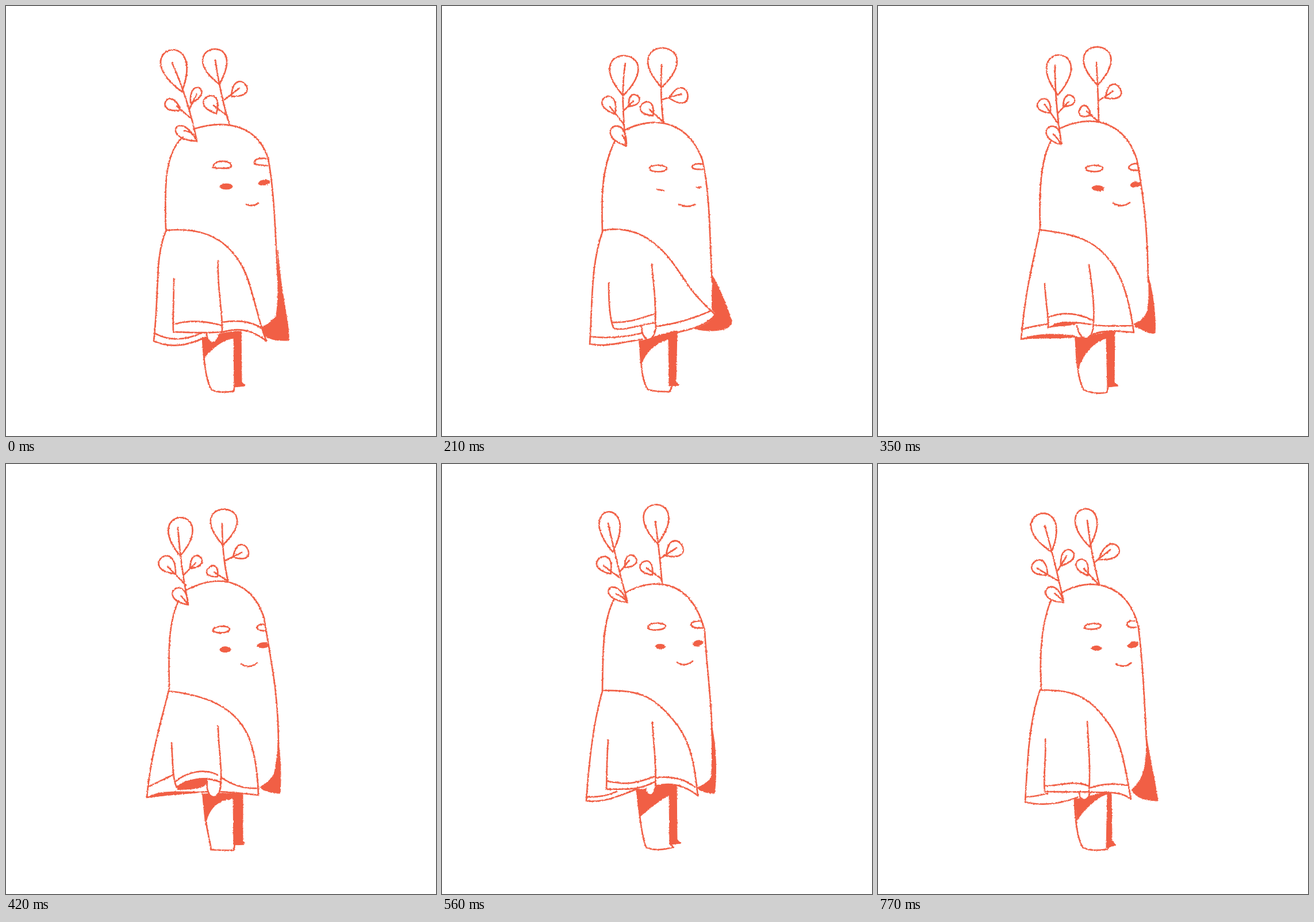
These frames come from a looping animation (748x748 px, 840 ms). An HTML page without scripts:

```html
<!DOCTYPE html>
<html lang="en">
<head>
<meta charset="utf-8">
<title>Sprout in a cloak</title>
<style>
html, body { margin: 0; width: 100%; height: 100%; overflow: hidden; background: #fff }
svg { display: block; width: 100%; height: 100% }
path { fill: none; stroke: #f15f45; stroke-width: 2.7; stroke-linecap: round; stroke-linejoin: round; animation: 840ms step-end infinite }
.solid { fill: #f15f45; stroke-width: 1 }

/* Drawn on 70 ms holds; steps() fills the holds between key poses. */
#left { animation-name: left }
#right { animation-name: right }
#head { animation-name: head }
#face { animation-name: face }
#eyes { animation-name: eyes }
#cloak { animation-name: cloak }
#sleeve { animation-name: sleeve }
#hand { animation-name: hand; fill: #fff }
#leg { animation-name: leg }
#shade { animation-name: shade }
#lining { animation-name: lining; stroke: none }

/* stem, big leaf, then small leaves with their veins */
@keyframes left {
0%, to { d: path("M289 99Q318 165 332 235M306 149C204 75 350 31 306 149M304 181C253 189 285 133 304 181M297 174L321 195M321 169C317 119 367 149 321 169M332 153L319 179M332 235C266 232 302 176 332 235M310 217Q325 218 332 235") }
8.333% { d: path("M304 103Q311 165 325 237M309 149C230 66 370 52 309 149M302 186C244 182 304 128 302 186M293 177L318 196M321 168C314 118 370 152 321 168M331 152L317 181M325 238C261 229 309 175 325 238M308 224Q318 226 325 238"); animation-timing-function: steps(2) }
25% { d: path("M319 99Q310 150 320 243M315 156C232 60 404 66 315 156M301 188C245 168 311 130 301 188M292 175L315 204M325 175C321 131 369 169 325 175M333 165L315 183M321 243C257 224 321 176 321 243M313 224Q319 232 321 243"); animation-timing-function: steps(2) }
41.666% { d: path("M308 103Q307 160 319 240M313 155C242 60 390 64 313 155M300 186C247 182 303 132 300 186M290 171L315 207M322 175C323 130 367 174 322 175M331 167L314 185M318 241C259 223 321 179 318 241M305 223Q313 230 318 241") }
50% { d: path("M299 110Q304 180 317 244M303 160C231 71 377 71 303 160M295 191C228 184 296 124 295 191M281 178L313 211M320 182C321 134 367 176 320 182M330 172L309 193M317 245C257 234 313 184 317 245M305 230Q312 237 317 245"); animation-timing-function: steps(2) }
66.666% { d: path("M289 103Q301 160 323 241M297 153C224 67 348 53 297 153M293 191C233 177 305 131 293 191M281 177L308 197M318 180C317 133 365 177 318 180M326 167L309 188M323 241C261 234 299 184 323 241M303 226Q314 230 323 241"); animation-timing-function: steps(3) }
91.666% { d: path("M290 107Q308 170 323 240M302 153C203 88 345 42 302 153M295 193C234 195 292 133 295 193M276 181L313 203M318 177C315 122 371 162 318 177M328 160L312 186M323 241C261 237 307 181 323 241M307 225Q316 231 323 241") }
}
@keyframes right {
0%, to { d: path("M364 94Q374 160 389 207M371 136C284 69 426 41 371 136M392 157C396 98 452 160 392 157M406 143L380 163M366 187C308 168 382 128 366 187M361 173L385 191") }
8.333% { d: path("M371 96Q377 150 386 206M377 140C290 68 448 52 377 140M391 157C394 101 450 163 391 157M401 147L381 163M367 187C312 186 374 132 367 187M360 178L382 191"); animation-timing-function: steps(2) }
25% { d: path("M382 102Q379 155 385 203M382 142C297 47 473 53 382 142M395 160C428 106 448 196 395 160M416 153L382 163M367 191C314 185 374 139 367 191M361 180L383 200"); animation-timing-function: steps(2) }
41.666% { d: path("M380 98Q383 150 384 201M382 138C298 49 464 49 382 138M396 160C402 101 454 171 396 160M409 148L385 164M370 190C329 204 361 146 370 190M363 183L383 201") }
50% { d: path("M376 104Q376 160 386 203M377 141C301 55 461 61 377 141M395 162C406 105 450 179 395 162M410 154L381 168M368 196C323 198 373 152 368 196M362 188L385 203"); animation-timing-function: steps(2) }
66.666% { d: path("M371 100Q378 150 383 208M375 139C294 52 446 44 375 139M390 160C396 95 454 171 390 160M408 146L380 164M366 193C315 186 371 142 366 193M356 181L382 200"); animation-timing-function: steps(3) }
91.666% { d: path("M364 98Q370 155 385 210M368 144C291 65 421 47 368 144M384 166C406 102 452 172 384 166M404 149L377 171M365 194C315 175 373 141 365 194M358 182L382 208") }
}
@keyframes head {
0%, to { d: path("M278 388C276 320 275 255 308 228M326 214C380 197 436 205 456 265C468 330 468 400 474 490") }
8.333% { d: path("M280 388C274 330 276 265 306 230M320 216C378 194 432 205 452 265C466 340 467 400 470 480"); animation-timing-function: steps(2) }
25% { d: path("M279 392C277 330 278 280 301 234M317 216C372 190 428 200 453 268C467 330 465 400 470 480"); animation-timing-function: steps(2) }
41.666% { d: path("M282 388C280 320 283 270 300 236M316 213C372 187 428 200 450 266C466 350 469 410 470 480") }
50% { d: path("M284 392C283 330 281 280 300 238M314 219C372 189 428 203 449 268C462 350 474 400 474 490"); animation-timing-function: steps(2) }
66.666% { d: path("M279 394C280 340 278 275 299 236M319 224C362 199 432 194 457 290C460 350 468 400 470 470"); animation-timing-function: steps(3) }
91.666% { d: path("M284 392C281 340 283 280 301 237M320 224C368 195 436 206 453 284C460 340 463 400 467 480") }
}
/* brows and mouth */
@keyframes face {
0%, to { d: path("M360 281C361 266 392 267 392 279C390 284 368 282 360 281M452 265C436 264 432 268 432 273C434 278 444 276 455 278M418 345Q428 350 439 343") }
8.333% { d: path("M360 279C360 271 393 271 393 279C393 287 360 287 360 279M453 267C446 268 437 270 434 273C438 278 444 278 453 279M418 346Q428 348 440 345"); animation-timing-function: steps(2) }
25% { d: path("M361 283C361 275 391 275 391 283C391 290 361 290 361 283M453 275C442 273 436 276 435 280C437 285 445 284 454 284M412 345Q428 352 440 345"); animation-timing-function: steps(2) }
41.666% { d: path("M361 283C365 275 391 276 391 282C391 291 361 289 361 283M452 274C444 273 437 277 436 281C438 286 446 286 454 286M409 343Q424 352 438 342") }
50% { d: path("M360 289C361 281 389 280 389 287C388 296 360 295 360 289M450 279C441 278 437 281 437 285C438 290 444 290 452 290M409 348Q424 357 437 346"); animation-timing-function: steps(2) }
66.666% { d: path("M358 284C360 274 389 275 389 283C386 290 358 291 358 284M452 273C440 272 433 276 433 279C435 285 444 286 453 285M409 345Q422 354 436 343"); animation-timing-function: steps(3) }
91.666% { d: path("M359 284C362 276 388 276 388 281C387 289 358 289 359 284M446 273C438 271 433 276 433 279C435 285 442 285 449 284M414 348Q429 356 440 346") }
}
@keyframes eyes {
0%, to { d: path("M372 314C373 307 394 308 394 314C394 320 373 321 372 314M439 309C440 301 459 301 459 306C458 312 440 314 439 309") }
8.333% { d: path("M374 315C375 309 393 309 393 315C392 321 375 320 374 315M440 311C442 304 458 304 458 309C456 314 441 315 440 311"); animation-timing-function: steps(2) }
25% { d: path("M373 319C378 318 385 320 387 321C385 322 378 322 373 319M442 315C445 314 450 314 452 315C450 317 445 317 442 315"); animation-timing-function: steps(2) }
41.666% { d: path("M372 316C374 311 393 311 393 318C392 324 373 323 372 316M439 312C440 304 457 304 457 310C456 315 440 318 439 312") }
50% { d: path("M372 323C372 316 391 316 391 323C390 329 372 329 372 323M437 316C440 309 457 309 457 315C455 322 439 321 437 316"); animation-timing-function: steps(2) }
66.666% { d: path("M371 317C372 312 388 312 388 318C386 324 372 323 371 317M436 314C438 305 453 305 454 310C452 318 437 319 436 314"); animation-timing-function: steps(3) }
91.666% { d: path("M371 321C376 314 384 315 390 321C384 326 376 325 371 321M434 317C436 308 453 306 453 313C452 320 435 322 434 317") }
}
/* back, collar, rear hem, front hem */
@keyframes cloak {
0%, to { d: path("M279 389C258 440 268 480 257 583M279 390C330 386 380 395 412 455C428 485 436 540 453 583M257 583C285 595 315 592 347 576M260 570C285 583 310 582 340 569M377 550C400 546 425 548 442 559M374 568C400 560 425 560 453 583") }
8.333% { d: path("M280 389C258 450 266 500 257 584M280 389C340 386 385 410 417 465C428 495 435 530 453 560M257 584C280 595 315 590 349 588M260 570C285 582 310 580 347 569M375 556C400 548 425 543 445 552M372 577C395 572 425 560 438 565"); animation-timing-function: steps(2) }
25% { d: path("M280 390C258 450 262 520 257 588M280 390C370 376 405 455 435 495C448 512 460 522 475 537M257 588C285 594 310 585 348 580M258 575C285 578 315 577 348 569M374 557C405 553 435 545 468 530M372 577C395 568 455 565 475 537"); animation-timing-function: steps(2) }
41.666% { d: path("M281 389C274 430 256 490 249 580M281 389C345 398 380 405 412 455C430 485 440 530 445 568M249 580C275 570 320 570 346 576M250 563C265 557 285 555 295 553M378 555C400 558 425 556 442 556M374 571C395 562 425 566 445 568") }
50% { d: path("M283 394C275 430 252 500 245 580M283 395C345 402 395 420 420 470C433 500 438 540 439 576M245 580C275 575 320 572 350 570M249 561C265 552 280 547 291 540M374 545C395 560 415 565 437 564M372 570C395 571 420 574 439 576"); animation-timing-function: steps(2) }
66.666% { d: path("M279 395C266 440 256 510 251 586M279 394C350 393 370 405 410 455C435 490 440 530 445 577M251 586C280 590 310 577 340 565M253 579C275 580 290 576 304 570M372 546C400 541 425 550 440 562M372 560C405 551 430 565 445 577"); animation-timing-function: steps(3) }
91.666% { d: path("M282 393C262 450 260 520 256 588M282 393C345 393 370 405 407 460C425 490 432 540 440 583M256 588C285 595 315 592 347 580M257 579C275 579 285 575 295 573M370 563C395 555 415 556 435 559M367 571C400 571 425 570 440 583") }
}
@keyframes sleeve {
0%, to { d: path("M292 474C292 510 290 540 291 567C310 567 340 570 375 567M369 443C367 490 377 530 376 566M295 553C320 546 350 548 376 556") }
8.333% { d: path("M292 475C290 510 291 540 291 555C310 561 340 568 371 567M369 440C370 480 376 530 370 566M292 538C310 553 340 553 371 553"); animation-timing-function: steps(2) }
25% { d: path("M290 482C290 520 293 550 299 561C320 565 335 556 371 551M365 449C367 480 373 510 371 553M296 550C320 552 340 545 368 536"); animation-timing-function: steps(2) }
41.666% { d: path("M290 483C292 520 297 540 296 560C315 550 335 548 371 554M367 450C373 490 378 530 374 562M298 541C320 532 345 533 374 547") }
50% { d: path("M288 485C290 520 290 550 297 562C315 548 345 543 372 553M369 456C369 490 377 530 373 565M294 553C315 535 345 529 368 541"); animation-timing-function: steps(2) }
66.666% { d: path("M289 480C286 520 287 540 286 566C310 564 335 571 370 553M366 449C368 490 374 530 371 562M289 552C320 558 335 557 371 543"); animation-timing-function: steps(3) }
91.666% { d: path("M291 478C293 510 287 545 290 570C310 570 340 571 367 570M364 448C366 490 370 530 367 570M292 560C315 560 340 549 366 560") }
}
@keyframes hand {
0%, to { d: path("M349 570C350 590 367 590 371 572") }
8.333% { d: path("M349 570C352 592 368 592 372 566"); animation-timing-function: steps(2) }
25% { d: path("M347 556C347 588 372 588 372 554"); animation-timing-function: steps(2) }
41.666% { d: path("M346 556C350 582 372 590 375 554") }
50% { d: path("M350 552C346 585 374 590 373 555"); animation-timing-function: steps(2) }
66.666% { d: path("M354 566C356 580 372 580 372 556"); animation-timing-function: steps(3) }
91.666% { d: path("M350 572C350 588 367 588 368 572") }
}
@keyframes leg {
0%, to { d: path("M342 577C344 620 348 655 358 668C370 673 385 672 396 670L398 660") }
8.333% { d: path("M342 590C346 630 350 650 356 664C365 671 385 671 396 669L398 660"); animation-timing-function: steps(2) }
25% { d: path("M344 583C346 630 349 655 358 667C370 671 385 671 396 671L400 662"); animation-timing-function: steps(2) }
41.666% { d: path("M344 578C345 630 350 655 358 668C370 673 385 675 398 672L401 660") }
50% { d: path("M343 575C346 630 354 650 357 671C370 672 385 672 396 672L398 662"); animation-timing-function: steps(2) }
66.666% { d: path("M339 566C344 620 350 655 355 667C370 673 385 671 402 667L397 660"); animation-timing-function: steps(3) }
91.666% { d: path("M342 583C343 630 349 655 356 667C370 674 385 672 400 670L402 662") }
}
/* far side of the cloak, then the legs */
@keyframes shade {
0%, to { d: path("M473 425C474 490 473 535 468 541C460 551 452 556 445 558C447 565 449 570 452 575C462 582 478 582 492 582C494 555 478 500 473 425M342 577C365 575 380 565 409 566L410 654L416 661L397 663L396 578C378 580 358 595 345 612Z") }
8.333% { d: path("M471 470C470 500 469 540 464 551C460 557 456 558 453 560C448 562 444 564 436 563C450 573 470 573 490 573C486 545 476 500 471 470M341 588C360 585 380 574 410 566L411 654L415 660L394 661L394 576C376 584 358 602 345 617Z"); animation-timing-function: steps(2) }
25% { d: path("M471 470C470 490 469 515 470 529C474 532 476 535 474 539C465 552 455 556 438 561C460 568 505 567 504 549C496 520 478 480 471 470M343 583C362 580 385 568 409 565L407 654L413 660L395 661L394 580C375 584 356 600 347 622Z"); animation-timing-function: steps(2) }
41.666% { d: path("M470 470C472 500 471 520 468 532C462 545 452 551 445 553C447 555 448 556 446 558C460 560 468 572 482 569C484 540 478 495 470 470M343 577C360 576 385 570 412 564L411 654L418 661L399 663L397 578C375 585 358 603 349 630Z") }
50% { d: path("M473 480C473 500 470 525 466 540C460 550 450 558 441 562C444 564 446 566 448 567C458 571 468 573 477 573C479 545 478 505 473 480M342 574C360 573 385 572 412 574L412 655L415 662L396 663L395 582C368 584 352 600 347 628Z"); animation-timing-function: steps(2) }
66.666% { d: path("M468 450C470 490 470 530 468 546C462 554 452 560 444 563C446 565 448 567 450 568C458 572 468 573 474 573C478 545 478 490 468 450M338 565C355 570 380 555 408 558L409 653L415 660L396 662L395 576C378 585 358 602 345 613Z"); animation-timing-function: steps(3) }
91.666% { d: path("M465 460C468 490 466 515 464 527C460 545 450 560 441 567C444 572 448 576 453 579C463 584 475 586 487 586C484 560 472 510 465 460M342 582C358 585 375 571 406 571L407 655L414 663L397 668L399 574C380 580 360 600 346 620Z") }
}
/* inside of the rear hem and cuff; flat when hidden */
@keyframes lining {
0%, to { d: path("M257 583C285 595 315 592 347 576C315 592 285 595 257 583M291 567C310 567 340 569 350 569C340 569 310 567 291 567") }
25% { d: path("M257 588C285 594 310 585 348 580C310 585 285 594 257 588M299 561C320 565 335 560 350 556C335 560 320 565 299 561"); animation-timing-function: steps(2) }
41.666% { d: path("M250 580C275 567 320 570 346 576C320 580 285 577 250 580M297 560C310 548 330 546 345 553C330 558 315 556 297 560") }
50% { d: path("M245 580C265 568 285 569 345 570C320 573 280 577 245 580M298 562C310 552 330 546 350 546C350 560 348 566 298 567"); animation-timing-function: steps(2) }
66.666% { d: path("M251 586C280 590 310 577 340 565C310 577 280 590 251 586M286 566C310 564 335 571 350 563C335 571 310 564 286 566") }
}
</style>
</head>
<body>
<svg viewBox="0 0 748 748">
  <filter id="crayon" x="0" y="0" width="748" height="748" filterUnits="userSpaceOnUse" color-interpolation-filters="sRGB">
    <feTurbulence type="fractalNoise" baseFrequency=".35" numOctaves="2" seed="4"/>
    <feDisplacementMap in="SourceGraphic" scale="3" xChannelSelector="R" yChannelSelector="G"/>
  </filter>
  <g filter="url(#crayon)">
    <path id="shade" class="solid"/>
    <path id="lining" class="solid"/>
    <path id="leg"/>
    <path id="hand"/>
    <path id="cloak"/>
    <path id="sleeve"/>
    <path id="head"/>
    <path id="left"/>
    <path id="right"/>
    <path id="face"/>
    <path id="eyes" class="solid"/>
  </g>
</svg>
</body>
</html>
```
